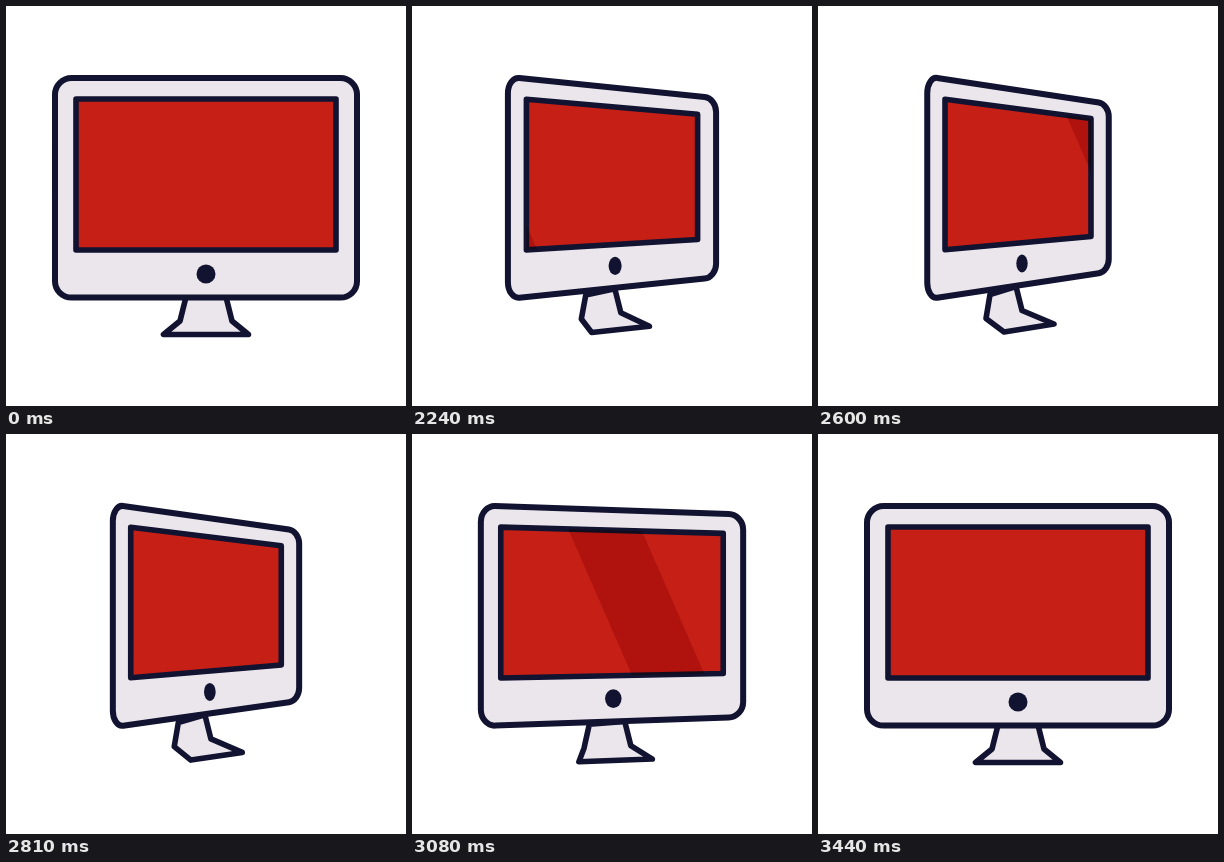
Recreate the animation shown at these times as an HTML page with a canvas. Size 400 px wide and 400 px high, loop 3.65 s.

```html
<!DOCTYPE html>
<html>
<head>
<meta charset="utf-8">
<title>Turning monitor</title>
<style>
  html, body { margin: 0; width: 100%; height: 100%; overflow: hidden; background: #fff; }
  canvas { display: block; width: 400px; height: 400px; }
</style>
</head>
<body>
<canvas id="stage" width="400" height="400"></canvas>
<script>
const ctx = document.getElementById('stage').getContext('2d');
const INK = '#121331', SHELL = '#ebe6ec', RED = '#c51f16', SHADE = '#e4999a';
const LOOP = 3650, START = 2030, END = 3440, STEP = 30, PEAK = 2600, SWEEP = 630;
const CX = 200, CY = 182;

const mix = (a, b, k) => a + (b - a) * k;
const toward = (a, b, k) => [mix(a[0], b[0], k), mix(a[1], b[1], k)];

// Ease with Bezier handles at 0.312 and 0.107, solved by bisection
function ease(x) {
  let lo = 0, hi = 1;
  for (let i = 0; i < 20; i++) {
    const s = (lo + hi) / 2, r = 1 - s;
    if (3 * r * s * (0.312 * r + 0.107 * s) + s ** 3 < x) lo = s; else hi = s;
  }
  return lo * lo * (3 - 2 * lo);
}

const turnAt = t => ease(Math.min(1, Math.max(0, (600 - Math.abs(t - PEAK)) / 540)));

// Upright rectangle in perspective: narrower, with the right side receding
function panel(halfWidth, top, bottom, squeeze, turn) {
  const corner = (side, y) => [
    CX + side * halfWidth * (1 - squeeze * turn),
    CY + (y - CY) * (1 - turn * (0.111 + 0.00083 * side * halfWidth))
  ];
  return [corner(-1, top), corner(1, top), corner(1, bottom), corner(-1, bottom)];
}

// Mirrored outline: rows from the neck down to the foot, skewed by the turn
function stand(turn) {
  const row = (y, half, turnedHalf, shift) => [-1, 1].map(side => [
    CX + shift * turn + side * mix(half, turnedHalf, turn),
    y - (6.5 + 4 * side) * turn
  ]);
  const rows = [row(291, 20, 13, -15), row(315, 26, 18, -14), row(328.5, 42.5, 25, 11)];
  return [...rows.map(r => r[0]), ...rows.map(r => r[1]).reverse()];
}

function polygon(points) {
  ctx.beginPath();
  points.forEach(pt => ctx.lineTo(...pt));
  ctx.closePath();
}

function roundedQuad(c) {
  ctx.beginPath();
  c.forEach((corner, i) => {
    const inset = i % 2 ? [0.055, 0.075] : [0.075, 0.055];
    const from = toward(corner, c[(i + 3) % 4], inset[0]);
    const to = toward(corner, c[(i + 1) % 4], inset[1]);
    ctx.lineTo(...from);
    ctx.bezierCurveTo(...toward(from, corner, 0.55), ...toward(to, corner, 0.55), ...to);
  });
  ctx.closePath();
}

function paint(fill, width) {
  ctx.fillStyle = fill;
  ctx.fill();
  ctx.strokeStyle = INK;
  ctx.lineWidth = width;
  ctx.lineJoin = 'round';
  ctx.stroke();
}

// Two slowing sweeps of a slanted band across the screen
function drawSheen(t, screen) {
  if (t < END - 2 * SWEEP || t >= END) return;
  const u = ((t - END + 2 * SWEEP) % SWEEP) / SWEEP;
  const x = -8 + 640 * u - 255 * u * u;
  const edge = (y, width) => [x + width - (240 - y) * 0.437, y];
  ctx.save();
  polygon(screen);
  ctx.clip();
  ctx.globalCompositeOperation = 'multiply';
  ctx.fillStyle = SHADE;
  polygon([edge(60, 0), edge(60, 73), edge(270, 73), edge(270, 0)]);
  ctx.fill();
  ctx.restore();
}

function draw(t) {
  const turn = turnAt(t);
  const screen = panel(130, 93, 244, 0.4385, turn);
  ctx.fillStyle = '#fff';
  ctx.fillRect(0, 0, 400, 400);
  polygon(stand(turn));
  paint(SHELL, 5.6);
  roundedQuad(panel(151, 72, 291.6, 0.399, turn));
  paint(SHELL, 6);
  polygon(screen);
  paint(RED, 5.6);
  drawSheen(t, screen);
  ctx.beginPath();
  ctx.ellipse(CX + 4 * turn, 268 - 10.5 * turn, 9.5 - 3.8 * turn, 9.5 - 0.5 * turn, 0, 0, 2 * Math.PI);
  ctx.fillStyle = INK;
  ctx.fill();
}

const origin = performance.now();
function tick() {
  const t = (performance.now() - origin) % LOOP;
  draw(t < START ? 0 : START + Math.floor((t - START) / STEP) * STEP);
  requestAnimationFrame(tick);
}
tick();
</script>
</body>
</html>
```
